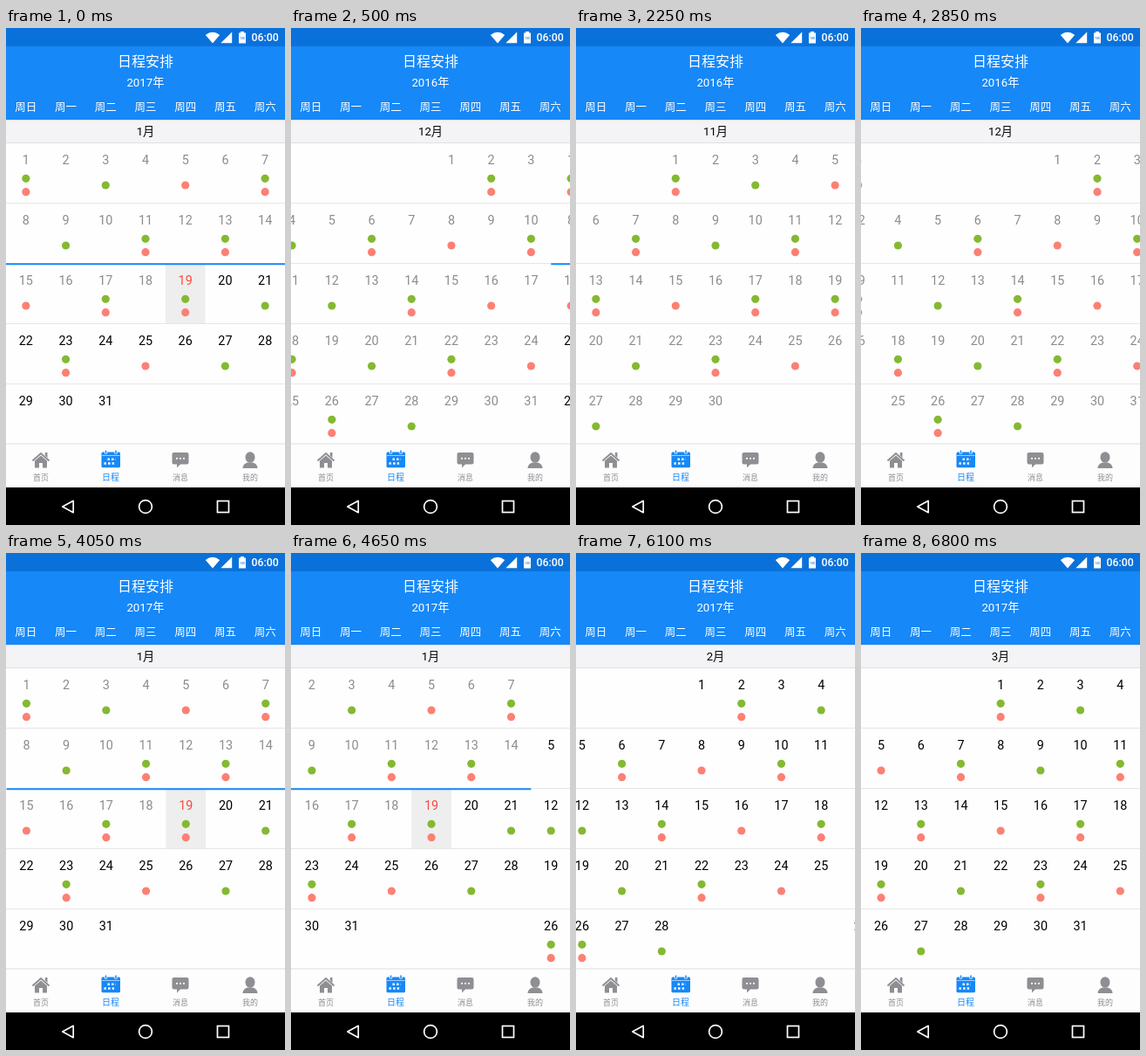
An HTML page that plays this animation: 320 by 569 pixels, repeating every 7.75 s.

```html
<!DOCTYPE html>
<html lang="zh-CN">
<head>
<meta charset="utf-8">
<title>日程安排</title>
<style>
  html, body { margin: 0; width: 100%; height: 100%; overflow: hidden; background: #fff; }
  svg { display: block; width: 100vw; height: 100vh; }
  text { font-family: Roboto, "Noto Sans CJK SC", "Noto Sans CJK", sans-serif; text-anchor: middle; }
  .day { font-size: 14.4px; }
  .blue { fill: #1688f8; }
  .gray { fill: #8e8e93; }
</style>
</head>
<body>
<svg viewBox="0 0 320 569">
  <rect width="320" height="569" fill="#fefefe"/>
  <g id="pages"></g>

  <!-- status bar and header -->
  <rect class="blue" width="320" height="105"/>
  <rect width="320" height="21" fill="#0b71da"/>
  <g fill="#fff">
    <path d="M228.8 8Q237 1.500 245.200 8L237 17.600ZM246.300 17.200L259.200 4.600V17.200Z"/>
    <path d="M267 5.500H269V4H273V5.500H275V17.500H267Z"/>
    <text x="271" y="13" font-size="4" fill="#0b71da">100</text>
    <text x="297.200" y="15.300" font-size="12.300" font-weight="500">06:00</text>
    <text x="160" y="44" font-size="16">日程安排</text>
    <text id="year" x="160" y="67.300" font-size="13.300"></text>
    <g id="weekdays" font-size="12.500"></g>
  </g>
  <rect y="105" width="320" height="27" fill="#f4f3f5"/>
  <path d="M0 105.500H320M0 131.500H320" stroke="#e0e0e2"/>
  <text id="month" x="160" y="122.800" font-size="13.200"></text>

  <!-- tab bar -->
  <rect y="476" width="320" height="50" fill="#fdfdfd"/>
  <path d="M0 476H320" stroke="#dcdcdc"/>
  <g class="gray">
    <path d="M30.500 495.500L40 487 49.500 495.500" fill="none" stroke="#8e8e93" stroke-width="2"/>
    <path d="M33 495.500L40 489.500 47 495.500V503.500H42V498H38V503.500H33ZM44.800 486H47.500V492L44.800 489.500Z"/>
    <path d="M192.500 486H207.500Q209.500 486 209.500 488V497.500Q209.500 499.500 207.500 499.500H200L196 503.500V499.500H192.500Q190.500 499.500 190.500 497.500V488Q190.500 486 192.500 486Z"/>
    <ellipse cx="280" cy="491.500" rx="5.500" ry="6.200"/>
    <path d="M271.500 504Q271.500 499 277 497.500H283Q288.500 499 288.500 504Z"/>
  </g>
  <path d="M196 492.800h.01M200 492.800h.01M204 492.800h.01" stroke="#fff" stroke-width="2.200" stroke-linecap="round"/>
  <rect class="blue" x="109.500" y="485.500" width="21.500" height="17.700" rx="1.500"/>
  <path d="M114.500 483.500V487.500M126 483.500V487.500" stroke="#fff" stroke-width="3.200"/>
  <path d="M114.500 483.500V487M126 483.500V487" stroke="#1688f8" stroke-width="1.500"/>
  <path d="M110 489.500H130.500" stroke="#fff" stroke-width=".6"/>
  <path d="M116.500 493.800h9.500M112.500 498.500h13.500" stroke="#fff" stroke-width="2.400" stroke-dasharray="2.400 2.200"/>
  <g class="gray" font-size="9">
    <text x="40" y="518">首页</text>
    <text class="blue" x="120" y="517.500" font-size="10">日程</text>
    <text x="200" y="518">消息</text>
    <text x="280" y="518">我的</text>
  </g>

  <!-- system navigation -->
  <rect y="526" width="320" height="43"/>
  <g fill="none" stroke="#fff" stroke-width="1.700">
    <path d="M77.200 541.300V554.700L64.800 548Z" stroke-linejoin="round"/>
    <circle cx="160" cy="548" r="7.400"/>
    <rect x="242.500" y="541.500" width="13" height="13"/>
  </g>
</svg>
<script>
const LOOP = 7750, WIDTH = 320, COL = WIDTH / 7, ROW = 69, TOP = 132;
const GREEN = '#84b931', RED = '#fc8074';
const TODAY = new Date(2017, 0, 19);
const MONTHS = [[2016, 11], [2016, 12], [2017, 1], [2017, 2], [2017, 3]];
const START_PAGE = 2;

// Each swipe is a finger drag followed by a decelerating settle.
const DRAGGED = 0.35;
const SWIPES = [
  { start: 30, release: 283, settle: 600, to: 1 },
  { start: 1080, release: 1433, settle: 600, to: 0 },
  { start: 2270, release: 2625, settle: 600, to: 1 },
  { start: 3600, release: 3740, settle: 450, to: 2 },
  { start: 4250, release: 4885, settle: 600, to: 3 },
  { start: 5950, release: 6350, settle: 600, to: 4 },
];

const $ = id => document.getElementById(id);
const colX = col => (col + 0.5) * COL;
const dot = (x, y, color) => `<circle cx="${x}" cy="${y}" r="4.6" fill="${color}"/>`;
const line = (y, color, width) =>
  `<path d="M0 ${y}H${WIDTH}" stroke="${color}" stroke-width="${width}"/>`;

function eventColors(month, day) {
  if (day > 28 || day % 2 !== month % 2) return [];
  const odd = month % 2;
  const green = odd ? day % 5 : day % 8;
  const red = odd ? day % 3 || day === 15 : day % 8 !== 4;
  return [green && GREEN, red && RED].filter(Boolean);
}

function dayCell(year, month, day) {
  const date = new Date(year, month - 1, day);
  const col = date.getDay();
  const row = Math.floor((day - 1 + new Date(year, month - 1, 1).getDay()) / 7);
  const x = colX(col), y = TOP + row * ROW;
  const isToday = +date === +TODAY;
  const color = isToday ? '#fb4a3c' : date < TODAY ? '#8c8c8c' : '#000';
  const colors = eventColors(month, day);
  const dots = colors.map((c, i) => dot(x, y + 48 + (i - (colors.length - 1) / 2) * 15.3, c));
  return (isToday ? `<rect x="${x - COL / 2}" y="${y}" width="${COL}" height="${ROW}" fill="#eeeeef"/>` : '')
    + `<text class="day" x="${x}" y="${y + 23.8}" fill="${color}">${day}</text>` + dots.join('');
}

function monthPage([year, month], index) {
  const length = new Date(year, month, 0).getDate();
  let page = '';
  for (let day = 1; day <= length; day++) page += dayCell(year, month, day);
  for (let row = 1; row < 5; row++) page += line(TOP + row * ROW - 0.5, '#e6e6e6', 1);
  if (index === START_PAGE) page += line(TOP + 2 * ROW + 0.2, '#1688f8', 2);
  return `<g transform="translate(${index * WIDTH})">${page}</g>`;
}

function pagerAt(t) {
  let position = START_PAGE, selected = START_PAGE;
  for (const { start, release, settle, to } of SWIPES) {
    if (t < start) break;
    const from = selected;
    const drag = (t - start) / (release - start);
    const left = Math.max(0, 1 - (t - release) / settle);
    const progress = t < release ? DRAGGED * drag ** 2 : 1 - (1 - DRAGGED) * left ** 5;
    position = from + (to - from) * progress;
    if (t >= release) selected = to;
  }
  return { position, selected };
}

function render() {
  const { position, selected } = pagerAt(performance.now() % LOOP);
  const [year, month] = MONTHS[selected];
  $('pages').setAttribute('transform', `translate(${-position * WIDTH})`);
  $('year').textContent = year + '年';
  $('month').textContent = month + '月';
  requestAnimationFrame(render);
}

$('weekdays').innerHTML = [...'日一二三四五六']
  .map((name, col) => `<text x="${colX(col)}" y="94.6">周${name}</text>`).join('');
$('pages').innerHTML = MONTHS.map(monthPage).join('');
render();
</script>
</body>
</html>
```
